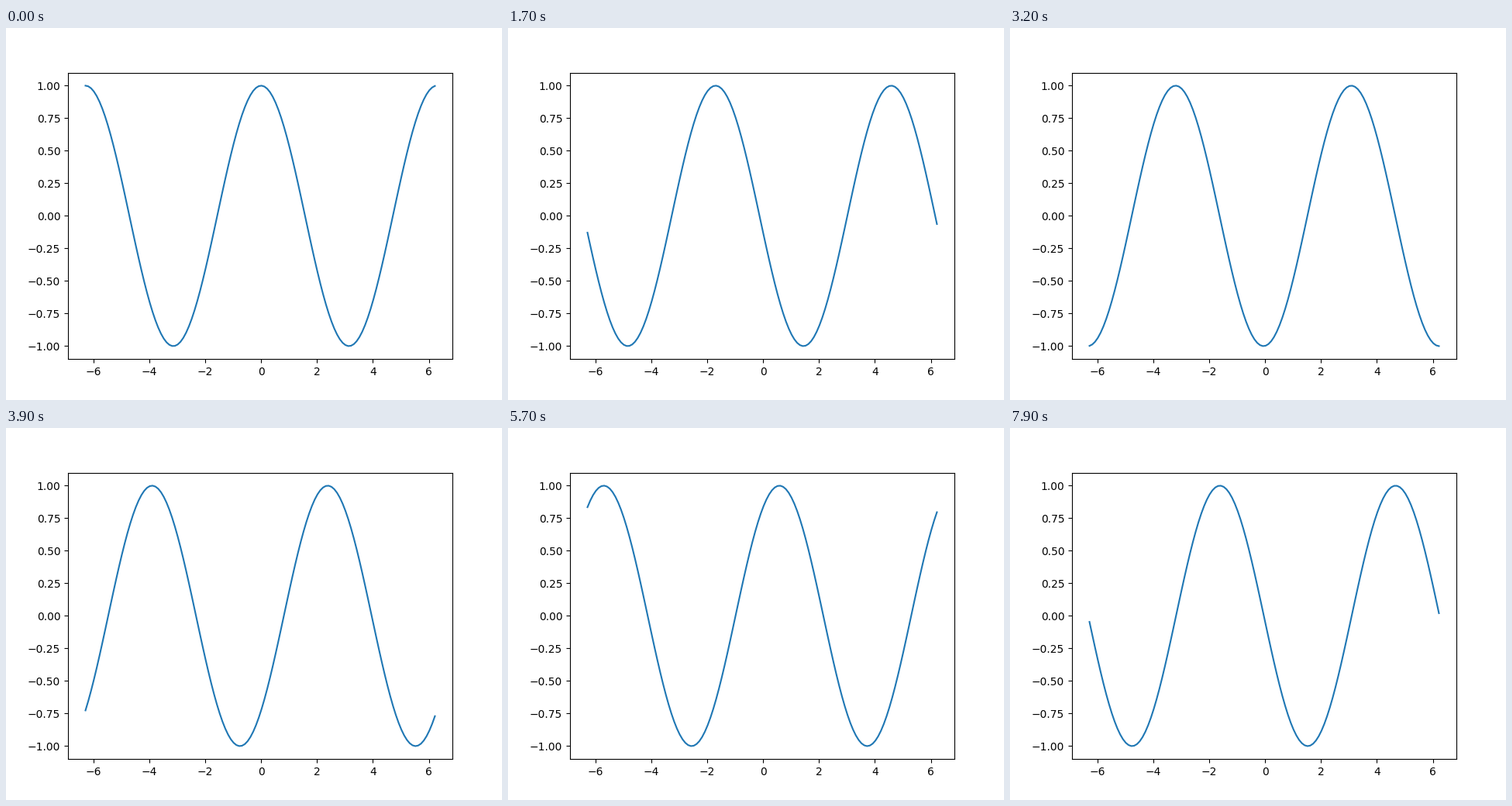
Recreate the animation shown at these times as a matplotlib script. Size 640 by 480 pixels, loop 8000 ms.

```python
import matplotlib.pyplot as plt
import numpy as np
from matplotlib.animation import FuncAnimation

FRAMES = 80
INTERVAL = 100  # ms
PHASE_STEP = 0.1  # radians per frame

plt.rcParams["font.family"] = "DejaVu Sans"

fig, ax = plt.subplots(figsize=(6.4, 4.8), dpi=100)
x = np.arange(-2 * np.pi, 2 * np.pi, 0.1)
line, = ax.plot(x, np.cos(x), color="#1f77b4", linewidth=1.5)

# Freeze the limits fitted to the first curve.
ax.set_xlim(ax.get_xlim())
ax.set_ylim(ax.get_ylim())


def update(i):
    line.set_ydata(np.cos(x + PHASE_STEP * i))
    return line,


anim = FuncAnimation(fig, update, frames=FRAMES, interval=INTERVAL,
                     repeat=True, repeat_delay=0)
plt.show()
```
